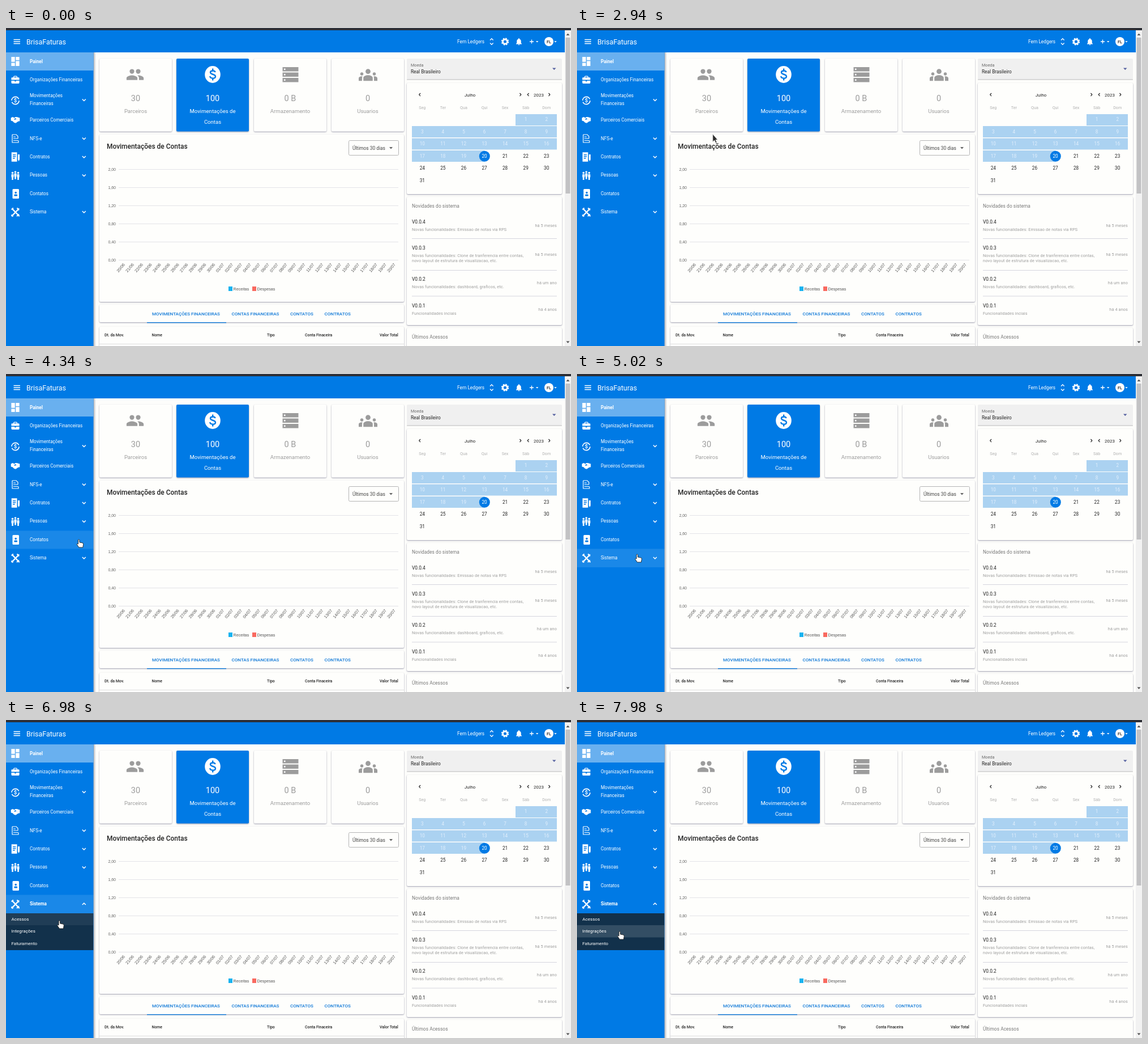
These frames come from a looping animation (998 px wide and 561 px high, 8000 ms). An HTML page:

```html
<!DOCTYPE html>
<html lang="pt-BR">
<head>
<meta charset="utf-8">
<title>Painel financeiro</title>
<style>
html, body { margin: 0; width: 100%; height: 100%; overflow: hidden; background: #fdfdfb }
svg { display: block; width: 100%; height: 100% }
text { font-family: Roboto, sans-serif; white-space: pre }
.plot text { font-family: "Liberation Sans", Arial, sans-serif }
.card { filter: drop-shadow(0 1px 1px rgba(45, 45, 85, .46)) }
</style>
</head>
<body>
<svg id="stage" viewBox="0 0 998 561"></svg>
<script>
const BLUE = '#007ae5', GREY = '#9c9c9c', INK = '#222', PAPER = '#fefefc';
const stage = document.getElementById('stage');
const out = [];
const add = s => out.push(s);

const rect = (x, y, w, h, fill, more = '') =>
  add(`<rect x="${x}" y="${y}" width="${w}" height="${h}" fill="${fill}" ${more}/>`);
const text = (x, y, str, size, fill, more = '') =>
  add(`<text x="${x}" y="${y}" font-size="${size}" fill="${fill}" ${more}>${str}</text>`);
const line = (d, stroke, w, more = '') =>
  add(`<path d="${d}" fill="none" stroke="${stroke}" stroke-width="${w}" ${more}/>`);
const circle = (x, y, r, fill, more = '') =>
  add(`<circle cx="${x}" cy="${y}" r="${r}" fill="${fill}" ${more}/>`);
const card = (x, y, w, h, fill = PAPER) => rect(x, y, w, h, fill, 'rx="2" class="card"');
// Icon on a 24-unit grid, centred on (x, y)
const icon = (x, y, size, d, fill = '#fff') =>
  add(`<path transform="translate(${x} ${y}) scale(${size / 24}) translate(-12 -12)" fill="${fill}" fill-rule="evenodd" d="${d}"/>`);
const MID = 'text-anchor="middle"', END = 'text-anchor="end"', BOLD = 'font-weight="700"', MEDIUM = 'font-weight="500"';
const NOTE = 'letter-spacing=".13"';

function summary() {
  const cards = [
    [165, '30', ['Parceiros']], [301, '100', ['Movimentações de', 'Contas']],
    [438, '0 B', ['Armazenamento']], [575, '0', ['Usuarios']]
  ];
  cards.forEach(([x, count, label], i) => {
    const fill = i === 1 ? '#fff' : GREY;
    card(x, 54, 128, 128.5, i === 1 ? BLUE : PAPER);
    text(x + 64, 129, count, 14.5, fill, MID);
    label.forEach((s, n) => text(x + 64, 150 + n * 18.5, s, 9.55, fill, MID));
  });
  icon(228, 82, 33, 'M8 11a3 3 0 1 0 0-6 3 3 0 0 0 0 6zM16 11a3 3 0 1 0 0-6 3 3 0 0 0 0 6zM8 13c-2.3 0-7 1.2-7 3.5V19h14v-2.5C15 14.2 10.3 13 8 13zM16 13l-1 .05c1.2.8 2 2 2 3.45V19h6v-2.5C23 14.2 18.3 13 16 13z', GREY);
  add('<ellipse cx="365" cy="82" rx="13.8" ry="15" fill="#fff"/>');
  line('M369.5 78C369 74.800 361 74.500 361 78.500c0 4 9 2.500 9 7 0 4.500-9.500 4-9.700-.5M365.200 71.500v3.500m0 14v3.500', BLUE, 2.400);
  [69, 78.500, 88].forEach(y => {
    rect(488.500, y, 28, 7.500, GREY);
    rect(491, y + 2.500, 2.500, 2.500, '#fff');
  });
  icon(639.500, 83, 33, 'M12 4.200a3.200 3.200 0 1 0 0 6.400 3.200 3.200 0 0 0 0-6.400zM6 19.500v-4c0-2 3-3.300 6-3.300s6 1.300 6 3.300v4zM4 8.500a2 2 0 1 0 0 4 2 2 0 0 0 0-4zM20 8.500a2 2 0 1 0 0 4 2 2 0 0 0 0-4zM0 19.500v-3.300c0-1.600 2-2.700 4.800-2.500-.5 1-.5 2-.5 5.800zM24 19.500v-3.300c0-1.600-2-2.700-4.800-2.500.5 1 .5 2 .5 5.800z', GREY);
}

function chart() {
  card(165, 188, 538, 295);
  text(178, 213, 'Movimentações de Contas', 11.95, INK, MEDIUM);
  rect(605.5, 198.5, 88, 26, PAPER, 'rx="2" stroke="#b5b5b5"');
  text(612, 214.5, 'Últimos 30 dias', 8.4, '#444');
  add('<path d="M677 210h6l-3 3.5z" fill="#666"/><g class="plot">');
  for (let i = 0; i < 6; i++) {
    const y = 249.5 + 32 * i;
    line(`M199 ${y}H693`, '#e3e3e8', 1);
    text(194, y + 2, (2 - .4 * i).toFixed(2).replace('.', ','), 7, '#666', END);
  }
  for (let i = 0; i < 31; i++) {
    const day = i < 11 ? i + 20 : i - 10;
    const label = String(day).padStart(2, '0') + (i < 11 ? '/06' : '/07');
    text(0, 2.5, label, 7.3, '#555', `${END} transform="translate(${208.5 + 15.93 * i} 416) rotate(-50)"`);
  }
  rect(393, 456, 7, 8, '#19b3f0');
  text(401.5, 463, 'Receitas', 7.2, '#555');
  rect(435, 456, 7, 8, '#f96a60');
  text(443.5, 463, 'Despesas', 7.2, '#555');
  add('</g>');
}

function table() {
  card(165, 488, 538, 31);
  [[258, 'MOVIMENTAÇÕES FINANCEIRAS'], [398.5, 'CONTAS FINANCEIRAS'], [502, 'CONTATOS'], [562.5, 'CONTRATOS']]
    .forEach(([x, s]) => text(x, 507, s, 8.05, '#1079d8', MEDIUM));
  rect(249, 519, 140, 1.4, '#1079d8');
  card(165, 527, 538, 50);
  [[174, 'Dt. da Mov.'], [257.5, 'Nome'], [461, 'Tipo'], [528, 'Conta Finaceira'], [660, 'Valor Total']]
    .forEach(([x, s]) => text(x, 544, s, 6.9, INK, MEDIUM));
  line('M165 557.5H703', '#ddd', 1);
}

function calendar() {
  rect(708, 54, 274, 37, '#f0f0f0', 'rx="2"');
  line('M708 91H982', '#aaa', .8);
  text(715, 68, 'Moeda', 7.28, '#666');
  text(715, 80, 'Real Brasileiro', 8.32, INK);
  add('<path d="M965 70.5h6.5l-3.25 3.5z" fill="#5560a0"/>');

  card(708, 97, 274, 196);
  line('M732 115l-2.3 2.6 2.3 2.6M907.5 115l2.3 2.6-2.3 2.6M923.5 115l-2.3 2.6 2.3 2.6M958.5 115l2.3 2.6-2.3 2.6', '#222', 1.2);
  text(819.5, 121, 'Julho', 7.95, INK, MID);
  text(941, 121, '2023', 8.05, INK, MID);
  const colX = c => 735.3 + 36.57 * c;
  'Seg Ter Qua Qui Sex Sáb Dom'.split(' ').forEach((s, c) => text(colX(c), 143, s, 7.2, '#b0b0b0', MID));
  const LIGHT = '#abd2f1';
  rect(900, 152, 73, 20, LIGHT);
  rect(717, 173, 256, 20, LIGHT);
  rect(717, 194.5, 256, 20, LIGHT);
  rect(717, 216, 128, 20, LIGHT);
  circle(845.3, 226.3, 9.5, BLUE);
  for (let d = 1; d <= 31; d++) {
    const n = d + 4;
    text(colX(n % 7), 164 + 21.6 * Math.floor(n / 7), d, 8.2, d < 20 ? '#e2effc' : d === 20 ? '#fff' : INK, MID);
  }
}

function news() {
  card(708, 298, 274, 226);
  text(717, 317, 'Novidades do sistema', 8.32, '#777', 'letter-spacing=".08"');
  [
    [345, 'V0.0.4', 'há 5 meses', 'Novas funcionalidades: Emissao de notas via RPS'],
    [390.5, 'V0.0.3', 'há 5 meses', 'Novas funcionalidades: Clone de tranferencia entre contas,', 'novo layout de estrutura de visualizacao, etc.'],
    [446, 'V0.0.2', 'há um ano', 'Novas funcionalidades: dashboard, graficos, etc.'],
    [492.5, 'V0.0.1', 'há 4 anos', 'Funcionalidades inciais']
  ].forEach(([y, version, age, ...lines]) => {
    text(717, y, version, 8.32, INK);
    text(973, y + (lines.length > 1 ? 11 : 6), age, 7.28, GREY, `${END} ${NOTE}`);
    lines.forEach((s, i) => text(717, y + 13 + 9.5 * i, s, 7.28, GREY, NOTE));
  });
  [371.5, 427.5, 473].forEach(y => line(`M717 ${y}H973`, '#d5d5de', 1));
  card(708, 529, 274, 50);
  text(717, 548, 'Últimos Acessos', 8.32, '#777', 'letter-spacing=".08"');
}

function header() {
  rect(0, 0, 998, 4, '#2d2f36');
  rect(0, 4, 987, 39, BLUE);
  line('M13.5 20.5h11.5m-11.5 3.5h11.5m-11.5 3.5h11.5', '#fff', 1.4);
  text(36, 28.5, 'BrisaFaturas', 12.48, '#fff');
  text(797, 26.5, 'Fern Ledgers', 8.32, '#fff');
  line('M855 21.5l2.8-2.8 2.8 2.8M855 26.5l2.8 2.8 2.8-2.8', '#fff', 1.3);
  circle(881.5, 24, 3.9, 'none', 'stroke="#fff" stroke-width="2.6"');
  circle(881.5, 24, 5.7, 'none', 'stroke="#fff" stroke-width="2" stroke-dasharray="2.7 1.777"');
  icon(906, 24, 15, 'M12 22a2 2 0 0 0 2-2h-4a2 2 0 0 0 2 2zM18 16v-5c0-3-1.6-5.6-4.5-6.3V4a1.5 1.5 0 0 0-3 0v.7C7.6 5.4 6 8 6 11v5l-2 2v1h16v-1z');
  line('M925 24h7m-3.5-3.5v7', '#fff', 1.3);
  add('<path d="M936 23h4.4l-2.2 2.4zM968.3 23h4.4l-2.2 2.4z" fill="#fff"/>');
  circle(959, 24, 8, '#fff');
  text(959, 26.7, 'FL', 7.3, '#222', `${MID} ${MEDIUM}`);
  rect(987, 4, 11, 557, '#f2f2f2');
  rect(988.5, 17, 8, 275, '#c2c2c4');
  add('<path d="M989.5 13h6l-3-3.5zM989.5 552.5h6l-3 3.5z" fill="#555"/>');
}

function sidebar() {
  add('<defs><linearGradient id="edge"><stop stop-color="#334" stop-opacity=".4"/><stop offset="1" stop-color="#334" stop-opacity="0"/></linearGradient></defs>');
  rect(154, 43, 5, 518, 'url(#edge)');
  rect(0, 43, 154.5, 518, BLUE);
  rect(0, 43, 154.5, 32, '#69b0ef');
  rect(0, 276.5, 154.5, 32, '#fff', 'id="contactHover" opacity="0"');
  rect(0, 308.5, 154.5, 32.5, '#fff', 'id="systemHover" opacity="0"');
  [
    [61.5, 'Painel', BOLD], [93.5, 'Organizações Financeiras'], [122, 'Movimentações'], [136, 'Financeiras'],
    [165, 'Parceiros Comerciais'], [197.5, 'NFS-e'], [230, 'Contratos'], [262, 'Pessoas'],
    [294.5, 'Contatos'], [327, 'Sistema', 'id="system"']
  ].forEach(([y, s, more]) => text(42, y, s, 8.15, '#fff', more));
  [127, 195, 227.5, 260, 324.5].forEach((y, i) =>
    line('M-3-1.5L0 1.5 3-1.5', '#fff', 1.5, `transform="translate(137.8 ${y})" ${i === 4 ? 'id="chevron"' : ''}`));

  icon(16.5, 59, 19, 'M3 2h8v11H3zM13 2h8v7h-8zM3 15h8v7H3zM13 11h8v11h-8z');
  icon(16.5, 91.5, 17, 'M9 2h6l2 2v2h3q2 0 2 2v4H2V8q0-2 2-2h3V4zM9 6h6V4H9zM2 14h8v2h4v-2h8v5q0 2-2 2H4q-2 0-2-2z');
  circle(16.5, 128, 6.6, 'none', 'stroke="#fff" stroke-width="1.6" stroke-dasharray="18 2.733"');
  text(16.5, 131.3, '$', 9, '#fff', `${MID} ${BOLD}`);
  icon(16.5, 162, 17, 'M1 7l4-2 5 2 2-2h4l3 1 4 1v8l-4 1-6 4-4-1-4-4-4-1zM11 8l-2 3 2 1 3-2 5 5-6-7z');
  line('M11 188h7l3 3v4M11 188v14h11v-3M13 192h4M13 195h8M13 198.5h9', '#fff', 1.2);
  icon(16.5, 227.5, 18, 'M3 1h13v22H3zM6 6v2h7V6zM6 10v2h7v-2zM6 14v2h5v-2zM18 6h4v12l-2 4-2-4z');
  [[11.5, 255.5], [16.5, 254], [21.5, 255.5]].forEach(([x, y]) => {
    circle(x, y, 1.8, '#fff');
    rect(x - 2, y + 2.2, 4, 6, '#fff', 'rx="1"');
    rect(x - 1.3, y + 7, 2.6, 5.5, '#fff');
  });
  rect(11.5, 284, 11.5, 17, '#fff', 'rx="1.5"');
  circle(17.2, 290.5, 1.8, BLUE);
  rect(14.2, 293.5, 6, 3, BLUE, 'rx="1.5"');
  line('M11 319l12 12.5M22.5 319l-12 12.5', '#fff', 2.3, 'stroke-linecap="round"');
  line('M9.8 320.5l3-3M19.5 317.5l3.5 4M9.5 329.5l3 3M19 332l4-3.5', '#fff', 2);

  add('<clipPath id="fold"><rect id="foldBox" y="341" width="154.5" height="0"/></clipPath><g clip-path="url(#fold)">');
  rect(0, 341, 154.5, 65, '#12314b');
  rect(0, 341, 154.5, 21, '#fff', 'id="accessHover" opacity="0"');
  rect(0, 362, 154.5, 21.5, '#fff', 'id="linkHover" opacity="0"');
  ['Acessos', 'Integrações', 'Faturamento'].forEach((s, i) => text(9.5, 354 + 21.3 * i, s, 8.07, '#fff'));
  add('</g>');
}

summary(); chart(); table(); calendar(); news(); sidebar(); header();
add('<path id="arrow" d="M0 0V13.5L3 10.8 5.2 15.5 7.2 14.5 5.1 10H8.6Z" fill="#2b2b2b" stroke="#eee" stroke-width=".7"/>');
add('<path id="hand" d="M-2.9-6.4q1.3-1.200 2.400.3V-2l5 1q1.800.4 1.800 2.200L5.400 7H-1.600L-5.300 1.500q0-1.700 2.400-.5z" fill="#fff" stroke="#222" stroke-width=".9"/>');
stage.innerHTML = out.join('');

// Pointer stops: time, x, y
const stops = [
  [20, 600, 487], [400, 964, 306], [580, 964, 306], [1380, 588, 254], [1680, 427, 248], [2100, 427, 248],
  [2820, 240, 187], [2920, 240, 187], [3660, 148, 306], [3760, 148, 306], [4500, 128, 298], [4600, 128, 298],
  [4960, 108, 325], [6280, 108, 325], [6960, 96, 361], [7120, 96, 361], [7860, 77, 380], [8000, 77, 380]
];
const $ = id => document.getElementById(id);
const ramp = (t, from, span) => Math.min(1, Math.max(0, (t - from) / span));
const set = (id, name, value) => $(id).setAttribute(name, value);

function pointer(t) {
  const i = Math.max(1, stops.findIndex(s => s[0] > t));
  const [t0, x0, y0] = stops[i - 1], [t1, x1, y1] = stops[i];
  const p = ramp(t, t0, t1 - t0), e = p * p * (3 - 2 * p);
  return [x0 + (x1 - x0) * e, y0 + (y1 - y0) * e];
}

function draw(t) {
  const [x, y] = pointer(t), onMenu = x < 155;
  for (const id of ['arrow', 'hand']) {
    set(id, 'transform', `translate(${x} ${y})`);
    set(id, 'visibility', t >= 20 && onMenu === (id === 'hand') ? 'visible' : 'hidden');
  }
  set('contactHover', 'opacity', .1 * (ramp(t, 3740, 200) - ramp(t, 4720, 200)));
  set('systemHover', 'opacity', .1 * (ramp(t, 4740, 200) - ramp(t, 7120, 300)));
  set('accessHover', 'opacity', .06 * (ramp(t, 6700, 200) - ramp(t, 7500, 200)));
  set('linkHover', 'opacity', .14 * ramp(t, 7540, 200));

  const open = 1 - (1 - ramp(t, 6006, 250)) ** 2;
  set('foldBox', 'height', 65 * open);
  set('system', 'font-weight', open > 0 ? 700 : 400);
  set('chevron', 'transform', `translate(137.8 324.5) rotate(${-180 * ramp(t, 6006, 120)})`);
}

const start = performance.now();
function tick() {
  draw((performance.now() - start) % 8000);
  requestAnimationFrame(tick);
}
tick();
</script>
</body>
</html>
```
